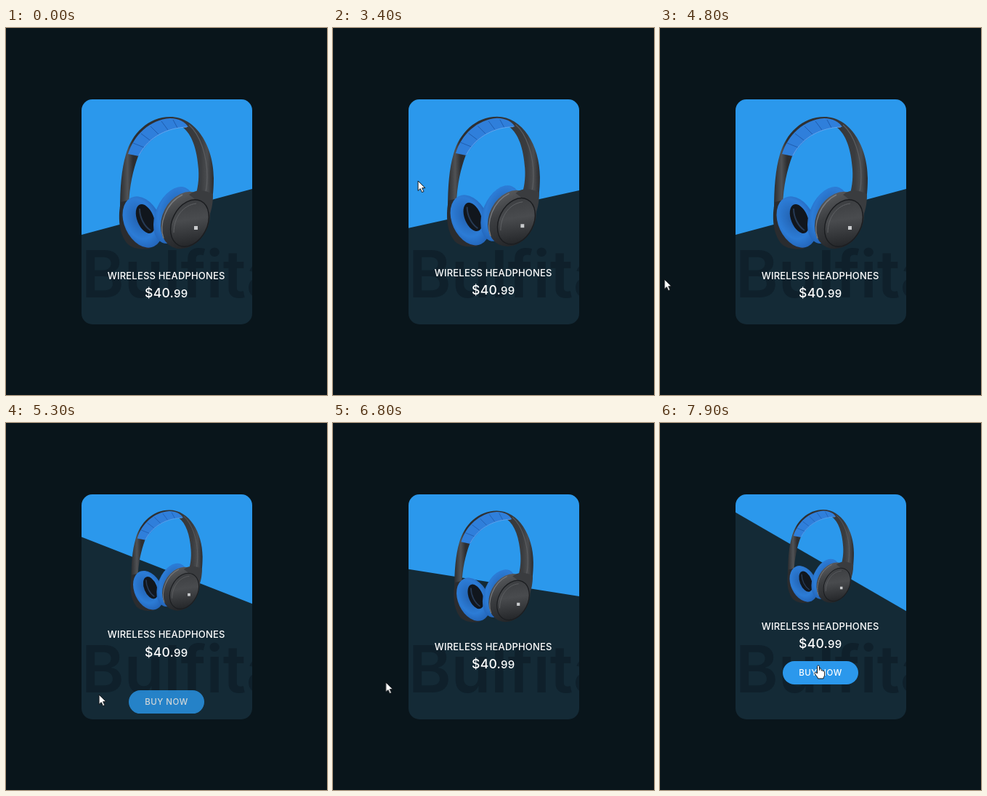
An HTML page that plays this animation: 442x504 px, repeating every 8 s.

```html
<!DOCTYPE html>
<html lang="en">
<head>
<meta charset="utf-8">
<title>Product card</title>
<style>
  /* --p: hover progress of the card, --hand: 1 while the pointer is over the button */
  @property --p { syntax: "<number>"; inherits: true; initial-value: 0; }
  @property --hand { syntax: "<number>"; inherits: true; initial-value: 0; }

  html, body { margin: 0; width: 100%; height: 100%; overflow: hidden; background: #09151b; }
  svg { display: block; width: 442px; height: 504px; animation: hover 8s ease infinite, hand 8s step-end infinite; }
  text { font-family: Inter, "Open Sans", sans-serif; font-weight: 500; fill: #fff; text-anchor: middle; }

  .slope { transform-origin: 221.5px 252.5px; transform: translateY(calc(-62px * var(--p))) skewY(calc(-15deg + 45deg * var(--p))); }
  .brand { font-size: 89px; font-weight: 600; fill: #0f202b; text-anchor: start; }
  .phones { transform-origin: 221.5px 122px; transform: translateY(calc(-3px * var(--p))) scale(calc(1 - .295 * var(--p))); }
  .info { transform: translateY(calc(-61px * var(--p))); }
  .title { font-size: 13px; letter-spacing: .17px; }
  .price { font-size: 17.6px; letter-spacing: .2px; }
  .cents { font-size: 15px; }
  .buy { opacity: var(--p); transform: translateY(calc(208px * (1 - var(--p)))); }
  .buy text { font-size: 11.5px; letter-spacing: .5px; }
  .cursor { animation: path 8s linear infinite; fill: #fff; stroke: #101418; stroke-width: 1; stroke-linejoin: round; }
  .arrow { opacity: calc(1 - var(--hand)); }
  .finger { opacity: var(--hand); }

  @keyframes hover {
    0%, 7.5% { --p: 0; }
    10%, 22.375% { --p: 1; }
    24.875%, 42.33% { --p: 0; }
    44.83%, 56.875% { --p: 1; }
    59.375%, 65% { --p: 0; }
    67.5%, 70.25% { --p: 1; }
    72.75%, 77.75% { --p: 0; }
    80.25%, 84.32% { --p: 1; }
    86.82%, 90.875% { --p: 0; }
    93.375%, 100% { --p: 1; }
  }
  @keyframes hand {
    0%, 17.8%, 54.85% { --hand: 0; }
    11.1%, 52.05%, 93.7%, 100% { --hand: 1; }
  }
  @keyframes path {
    0% { transform: translate(341px, -20px); }
    3.75% { transform: translate(341px, 0); }
    7.5% { transform: translate(320px, 98px); }
    11.25% { transform: translate(215px, 338px); }
    17.5% { transform: translate(215px, 340px); }
    22.375% { transform: translate(105px, 170px); }
    23.75% { transform: translate(52px, 100px); }
    25% { transform: translate(22px, 68px); }
    28.125% { transform: translate(10px, 78px); }
    33.75% { transform: translate(50px, 67px); }
    41.625% { transform: translate(102px, 196px); }
    42.5% { transform: translate(117px, 210px); }
    48.75% { transform: translate(148.5px, 210px); }
    52.5%, 53.75% { transform: translate(218px, 343px); }
    56.25% { transform: translate(106px, 330px); }
    60% { transform: translate(6px, 345px); }
    62.5% { transform: translate(20px, 368px); }
    65% { transform: translate(104px, 374px); }
    66.25% { transform: translate(128px, 373px); }
    68.125% { transform: translate(138px, 368px); }
    70.25% { transform: translate(104px, 364px); }
    73.75% { transform: translate(7px, 358px); }
    77.75% { transform: translate(104px, 362px); }
    80.625% { transform: translate(146px, 358px); }
    84.32% { transform: translate(104px, 357px); }
    85% { transform: translate(73px, 356px); }
    87.5% { transform: translate(9px, 352px); }
    90% { transform: translate(86px, 350px); }
    90.875% { transform: translate(104px, 348px); }
    95% { transform: translate(200px, 341px); }
    96.875%, 100% { transform: translate(218px, 333px); }
  }
</style>
</head>
<body>
<svg viewBox="0 0 442 504">
  <defs>
    <clipPath id="card"><rect x="104" y="98" width="235" height="309" rx="15"/></clipPath>
    <linearGradient id="band">
      <stop offset="0" stop-color="#2b2d30"/><stop offset=".08" stop-color="#505255"/>
      <stop offset=".14" stop-color="#2c2e31"/><stop offset=".5" stop-color="#303235"/>
      <stop offset=".86" stop-color="#3a3c3f"/><stop offset=".93" stop-color="#4b4d50"/>
      <stop offset="1" stop-color="#2a2c2f"/>
    </linearGradient>
    <linearGradient id="shell" x1="0" y1="0" x2="1" y2="1">
      <stop offset="0" stop-color="#66686b"/><stop offset=".4" stop-color="#3c3e41"/>
      <stop offset="1" stop-color="#1b1d20"/>
    </linearGradient>
    <linearGradient id="plate" x1=".2" y1="0" x2=".7" y2="1">
      <stop offset="0" stop-color="#3a3c3f"/><stop offset=".45" stop-color="#494b4e"/>
      <stop offset="1" stop-color="#222427"/>
    </linearGradient>
    <radialGradient id="pad" cx=".45" cy=".42" r=".6">
      <stop offset="0" stop-color="#2260ae"/><stop offset=".65" stop-color="#2c7cd6"/>
      <stop offset="1" stop-color="#2364b8"/>
    </radialGradient>
  </defs>

  <g clip-path="url(#card)">
    <rect x="104" y="98" width="235" height="309" fill="#142a36"/>
    <rect class="slope" x="104" y="-200" width="235" height="452.5" fill="#2b98ec"/>
    <text class="brand" x="104" y="370">Bulfitan</text>

    <g class="phones">
      <!-- headband -->
      <path fill="url(#band)" d="M157 250C157 220 159 194 165 174C173 145 196 122 226 122C262 122 286 163 286 206C286 225 284 240 280 258L260 234C264 221 266 209 265 194C263 166 256 146 243 136C215 137 190 152 182 176C175 195 170 216 169 244Z"/>
      <path fill="#2f7fdb" d="M168 173C176 147 198 126 226 124C238 124 247 129 251 136C228 136 201 145 183 176Z"/>
      <path fill="none" stroke="#1f5daf" d="M175 158L190 164M186 145L198 154M199 135L210 146M214 128L223 140M230 126L236 137"/>
      <path fill="none" stroke="#63a6ee" d="M183 175C197 148 224 137 249 136"/>
      <path fill="none" stroke="#5b5d60" stroke-width="1.2" d="M252 133C268 147 277 177 277 204C277 217 275 227 272 235"/>

      <!-- left cup -->
      <path fill="#2a2c2f" d="M158 239C154 258 155 281 166 295C172 302 184 305 198 303L204 290L172 236Z"/>
      <ellipse cx="188" cy="266.5" rx="25" ry="37" transform="rotate(-25 188 266.5)" fill="url(#pad)"/>
      <ellipse cx="192" cy="262" rx="11.5" ry="21" transform="rotate(-22 192 262)" fill="#11161d"/>
      <path fill="none" stroke="#273a55" stroke-width="2" d="M184 248C184 260 190 272 199 278"/>

      <!-- right cup -->
      <ellipse cx="231" cy="257" rx="25" ry="41" transform="rotate(23 231 257)" fill="url(#pad)"/>
      <ellipse cx="247" cy="264" rx="32" ry="41" transform="rotate(27 247 264)" fill="url(#shell)"/>
      <path fill="none" stroke="#77797c" stroke-width="1.4" d="M217 289C210 270 220 240 243 229"/>
      <path fill="#3a3c3f" d="M252 229C261 221 273 222 285 228C285 241 283 251 279 260C272 246 264 237 252 229Z"/>
      <ellipse cx="253" cy="268" rx="24" ry="34" transform="rotate(27 253 268)" fill="url(#plate)" stroke="#1b1d20" stroke-width="1.5"/>
      <path fill="none" stroke="#606265" d="M231 281C231 260 244 243 262 241"/>
      <rect x="259" y="272" width="5" height="5" fill="#c9cbcd"/>
    </g>

    <g class="info">
      <text class="title" x="220.7" y="344.6">WIRELESS HEADPHONES</text>
      <text class="price" x="220.7" y="370">$40.<tspan class="cents">99</tspan></text>
    </g>
    <g class="buy">
      <rect x="169" y="327" width="104" height="32" rx="16" fill="#2b98ec"/>
      <text x="221" y="347">BUY NOW</text>
    </g>
  </g>

  <g class="cursor">
    <path class="arrow" d="M0 0V13.5L3.2 10.6L5.4 15.6L7.8 14.6L5.6 9.7H9.8Z"/>
    <path class="finger" d="M-1.5 1.5C-1.5-.5 1.5-.5 1.5 1.5V6.5C2-.0 4.3 5.5 4.2 7.2C5 6 6.6 6.4 6.6 8C7.4 7 8.6 7.6 8.6 9V13C8.6 15 7.2 15.5 7 18H-.5C-.8 15.5-4.5 13-5 10.5C-5 8.8-3.2 8.8-1.5 11Z"/>
  </g>
</svg>
</body>
</html>
```
